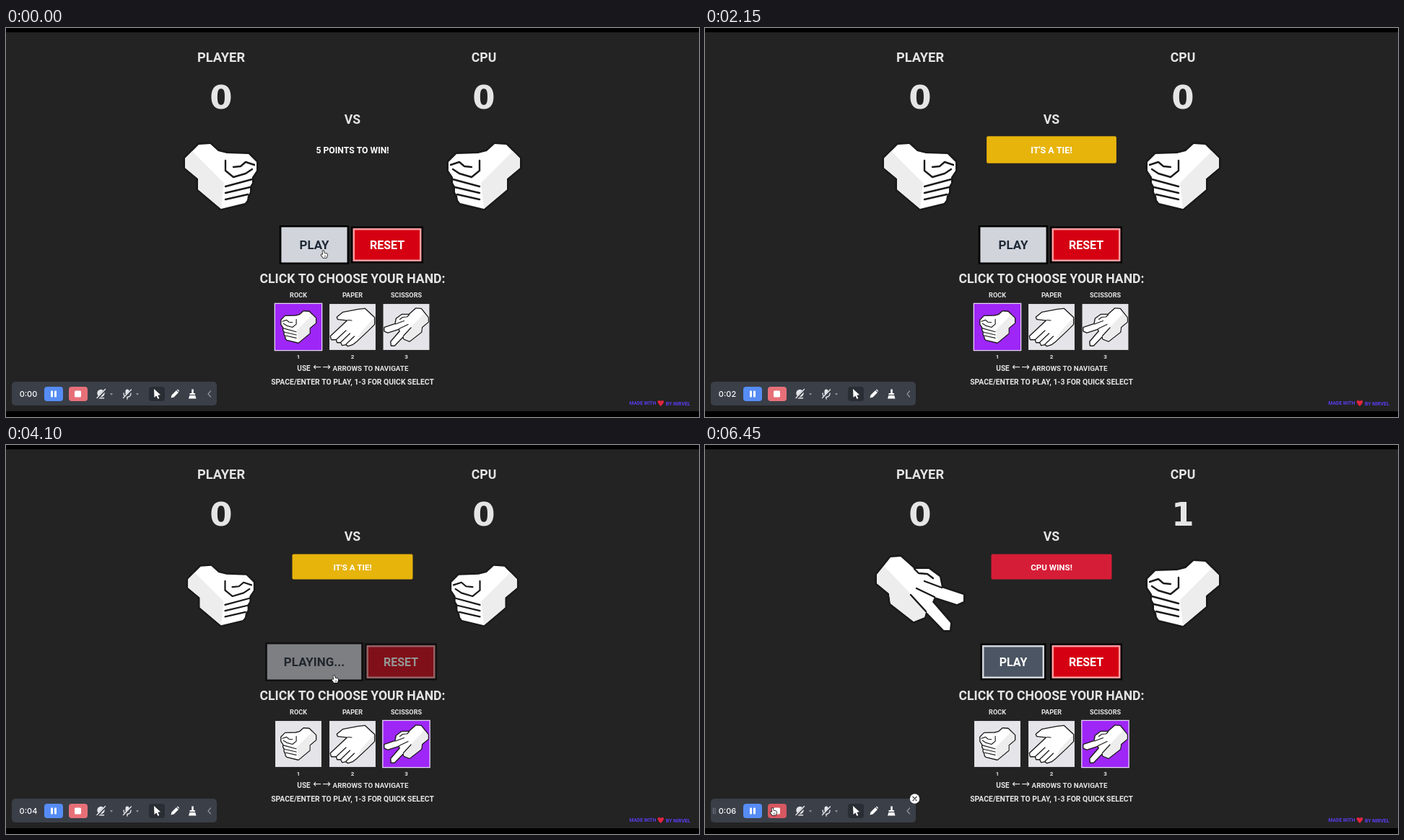
An HTML page with a canvas that plays this animation: 960x540 px, repeating every 6500 ms.

```html
<!DOCTYPE html>
<html lang="en">
<head>
<meta charset="utf-8">
<title>Rock Paper Scissors</title>
<style>
html, body { margin: 0; width: 100%; height: 100%; overflow: hidden; background: #000; }
canvas { display: block; }
</style>
</head>
<body>
<canvas id="stage" width="960" height="540"></canvas>
<script>
const ctx = document.getElementById('stage').getContext('2d');
const LOOP = 6500, STEP = 50;
const BG = '#232323', INK = '#e5e5e5', DARK = '#1a1a1a';
const ROUNDS = [
  { start: 300, end: 1830, label: "IT'S A TIE!", color: [231, 180, 12] },
  { start: 3650, end: 5150, label: 'CPU WINS!', color: [214, 29, 55] }
];
const PICK = 2780;

// Hands are drawn around their own centre, fingers pointing right.
const HANDS = {
  rock: {
    body: 'M-50-25L-31-44L-15-45L-4-35L8-32L38-31L49-20L49-8L43 1L43 9L40 14L40 22L37 27L36 33L33 37L0 45L-32 18L-32 3L-50-12Z',
    shade: 'M-50-25L-40-35L4 9L0 45L-32 18L-32 3L-50-12Z',
    lines: 'M6-22V-8L17 1L34-4L43-10M17-13L27-14L34-20L46-16M6 14L43 4M6 23L40 15M6 32L37 25'
  },
  scissors: {
    body: 'M-60-26L-41-50L-27-51L-8-34L12-34L27-23L30-8L60 2L60 11L51 15L20 5L17 12L42 41L41 51L33 51L8 25L6 33L-9 39L-41 14L-43 0L-60-14Z',
    shade: 'M-60-26L-50-38L-6 8L8 25L6 33L-9 39L-41 14L-43 0L-60-14Z',
    lines: 'M-8-34L-2-28L10-27L18-21M6-17L30-8M-5-7L20 5M-13 2L8 25'
  },
  paper: {
    body: 'M-60-26L-34-50L-16-48L26-40L42-27L40-22L12-19L60 26L58 34L44 34L42 42L32 42L28 50L18 48L12 52L0 48L-8 42L-40 12L-60-8Z',
    shade: 'M-60-26L-24 14L-8 42L-40 12L-60-8Z',
    lines: 'M12-19L2-18M18 10L44 34M7 18L32 42M-5 26L18 48'
  }
};
for (const hand of Object.values(HANDS))
  for (const part in hand) hand[part] = new Path2D(hand[part]);

const clamp = v => Math.max(0, Math.min(1, v));
const progress = (t, start, span) => clamp((t - start) / span);
const smooth = p => p * p * (3 - 2 * p);
const between = (t, a, b) => t >= a && t < b;
const rgb = c => `rgb(${c.map(Math.round)})`;
const mix = (a, b, p) => rgb(a.map((v, i) => v + (b[i] - v) * p));
const pulse = (t, a, b) => smooth(progress(t, a, 150)) * (1 - smooth(progress(t, b, 150)));

function rect(x, y, w, h, color, r = 0) {
  ctx.fillStyle = color;
  ctx.beginPath();
  ctx.roundRect(x, y, w, h, r);
  ctx.fill();
}

function box(w, h, color) {
  rect(-w / 2, -h / 2, w, h, color);
}

function disc(x, y, r, color) {
  ctx.fillStyle = color;
  ctx.beginPath();
  ctx.arc(x, y, r, 0, Math.PI * 2);
  ctx.fill();
}

function text(str, x, y, size, color = INK, family = 'Roboto, sans-serif', weight = 700) {
  ctx.font = `${weight} ${size}px ${family}`;
  ctx.textAlign = 'center';
  ctx.fillStyle = color;
  ctx.fillText(str, x, y + size * 0.36);
}

function line(d, color, width) {
  ctx.strokeStyle = color;
  ctx.lineWidth = width;
  ctx.stroke(new Path2D(d));
}

function shape(d, color) {
  ctx.fillStyle = color;
  ctx.fill(new Path2D(d));
}

function at(x, y, sx, sy, draw) {
  ctx.save();
  ctx.translate(x, y);
  ctx.scale(sx, sy);
  draw();
  ctx.restore();
}

function drawHand(kind, x, y, scale, flip, alpha = 1) {
  const hand = HANDS[kind];
  at(x, y, flip ? -scale : scale, scale, () => {
    ctx.globalAlpha = alpha;
    ctx.strokeStyle = DARK;
    ctx.lineWidth = 5.5;
    ctx.stroke(hand.body);
    ctx.fillStyle = '#fff';
    ctx.fill(hand.body);
    ctx.fillStyle = '#ededed';
    ctx.fill(hand.shade);
    ctx.lineWidth = 2.4;
    ctx.stroke(hand.lines);
  });
}

function drawPlayers(t, round) {
  let scale = 1, lift = 0;
  if (round) {
    const swing = Math.sin((t - round.start) / 420 * Math.PI * 2);
    const enter = progress(t, round.start, 150);
    scale = 1 - (0.07 + 0.035 * swing) * enter;
    lift = 7 * swing;
  }
  const fade = changes => {
    const last = changes.filter(c => c <= t).pop();
    return last === undefined ? 1 : progress(t, last, 250);
  };
  const mine = fade([1830, 2810, 3650, 5150]);
  const theirs = fade([1830, 5150]);
  const kind = between(t, 2810, 3650) || t >= 5150 ? 'scissors' : 'rock';
  drawHand(kind, 298, 206 + lift, scale * (0.8 + 0.2 * mine), false, mine);
  drawHand('rock', 662, 206 + lift, scale * (0.8 + 0.2 * theirs), true, theirs);
}

function drawBanner(t) {
  const result = ROUNDS.filter(r => r.end <= t).pop();
  if (!result) return text('5 POINTS TO WIN!', 480, 170, 12.2, '#fff');
  const scale = 1 + 0.13 * Math.sin(Math.PI * progress(t, result.end, 400));
  at(480, 169, scale, scale, () => {
    rect(-83.5, -17.5, 167, 35, rgb(result.color), 2);
    text(result.label, 0, 0.5, 11.6, '#fff');
  });
}

function drawButton(x, w, scale, fill, border, ink, label, disabled) {
  at(x, 301, scale, scale, () => {
    box(w, 51, '#000');
    box(w - 5, 46, border);
    box(w - 10, 41, fill);
    text(label, 0, 0, 16, ink);
    if (disabled) {
      ctx.globalAlpha = 0.48;
      box(w, 51, BG);
    }
  });
}

function drawButtons(t, round) {
  const hover = Math.max(1 - smooth(progress(t, 2250, 150)), pulse(t, 3450, 5550));
  const fill = mix([75, 85, 99], [209, 213, 219], hover);
  const ink = mix([255, 255, 255], [31, 41, 55], hover);
  const busy = Boolean(round);
  drawButton(427, busy ? 128 : 91, 1 + 0.06 * hover, fill, '#d1d5db', ink, busy ? 'PLAYING...' : 'PLAY', busy);
  drawButton(busy ? 547 : 528, 100, 1, '#d50012', '#ff9ca2', '#fff', 'RESET', busy);
}

function drawTile(name, x, index, scale, picked) {
  const outer = 64 + 2.6 * picked, inner = 63 + picked;
  text(name.toUpperCase(), x, 370.5, 9.1);
  at(x, 415, scale, scale, () => {
    box(outer, outer, mix([205, 205, 210], [233, 213, 255], picked));
    box(inner, inner, mix([229, 229, 233], [158, 38, 246], picked));
    drawHand(name, 0, 0, name === 'rock' ? 0.48 : 0.5, true);
  });
  text(index, x, 456, 8);
}

function drawChooser(t) {
  text('CLICK TO CHOOSE YOUR HAND:', 480, 348, 17.6);
  const picked = progress(t, PICK, 140);
  const hover = pulse(t, 2620, 3150);
  drawTile('rock', 405, '1', 1, 1 - picked);
  drawTile('paper', 480, '2', 1, 0);
  drawTile('scissors', 554.5, '3', 1 + 0.07 * hover, picked);
  text('USE', 412.5, 472, 10);
  text('←', 431, 470, 14, INK, '"DejaVu Sans", sans-serif', 400);
  text('→', 444, 470, 14, INK, '"DejaVu Sans", sans-serif', 400);
  text('ARROWS TO NAVIGATE', 505, 472, 9.8);
  text('SPACE/ENTER TO PLAY, 1-3 FOR QUICK SELECT', 480, 491, 10.4);
}

function drawCredit() {
  const violet = '#5b3df0';
  text('MADE WITH', 882, 521, 6.7, violet);
  text('BY NIRVEL', 931, 521, 7, violet);
  shape('M907 525C900 519 903 515 907 518C911 515 914 519 907 525Z', '#e2263f');
}

function drawToolbar(t) {
  const hover = progress(t, 6200, 100);
  const panel = '#3a3f48', grey = '#e4e6e9', dim = '#8b9099';
  rect(8, 491, 284, 33, panel, 5);
  text(`0:0${Math.floor(t / 1000)}`, 31, 508, 11, '#fff', 'Inter, sans-serif', 500);
  rect(53, 498, 26, 20, '#568cf5', 4);
  rect(62, 503.5, 3, 9, '#fff', 1);
  rect(67, 503.5, 3, 9, '#fff', 1);
  rect(87, 498, 26, 20, mix([231, 112, 120], [214, 88, 97], hover), 4);
  rect(95, 503.5, 9, 9, '#fff', 1.5);

  disc(131.5, 507, 5.2, grey);
  line('M127.5 513.7H135.5', grey, 1.6);
  line('M126.5 514.5L138 502', panel, 3);
  line('M126 513.5L137.5 501.5', grey, 1.4);
  rect(165.5, 501.5, 5, 8.5, grey, 2.5);
  line('M163 507C163 514 173 514 173 507M168 512V515', grey, 1.4);
  line('M163 514.5L174 503', panel, 3);
  line('M162.5 513.5L173.5 502', grey, 1.4);
  for (const x of [146, 182]) shape(`M${x - 2} 507H${x + 2}L${x} 510Z`, dim);

  rect(198, 498, 22, 20, '#292d34', 4);
  shape('M205 501L205.5 513L208.3 510.5L210.5 515L212.3 514L210.3 509.8L214 509.3Z', '#fff');
  shape('M228.5 513.5L229.5 509.5L236 503L239 506L232.5 512.5ZM236.7 502.2L238 501.5L240 503.8L239.6 505Z', '#fff');
  shape('M257.2 501.5H259.8V507H262V509H254.5V507H257.2ZM254.3 510H262.2L263.5 514.5H253Z', '#fff');
  line('M283.5 504L280 508L283.5 512', dim, 1.3);

  if (hover > 0) {
    line('M11.5 504V512M14 504V512', '#757b85', 1);
    disc(290.5, 491, 6.7, '#fff');
    line('M288 488.5L293 493.5M293 488.5L288 493.5', '#333', 1.2);
  }
}

const CURSOR_STOPS = [
  [0, 441, 314], [2200, 441, 314], [2700, 553, 421], [3100, 553, 421],
  [3550, 456, 325], [5500, 456, 325], [5800, 440, 355], [6250, 95, 509], [LOOP, 95, 509]
];

function drawCursor(t) {
  if (between(t, 2100, 2250)) return;
  const i = CURSOR_STOPS.findIndex(stop => stop[0] > t);
  const [t0, x0, y0] = CURSOR_STOPS[i - 1];
  const [t1, x1, y1] = CURSOR_STOPS[i];
  const p = smooth(progress(t, t0, t1 - t0));
  const pointing = !between(t, 2250, 2620) && !between(t, 3200, 3450) && !between(t, 5600, 6200);
  const path = new Path2D(pointing
    ? 'M-2.5-4.5Q-1.5-5.5-.7-4.3L-.3-1.5L3.2-.8Q4.5-.2 4 2.2L2.8 5H-1.5L-4.3 1.5Q-4.5 0-3 .3L-1.9 1.2Z'
    : 'M-3-5L-3 5L-.6 3L1 6.5L2.6 5.7L1 2.4L4 2.2Z');
  at(x0 + (x1 - x0) * p, y0 + (y1 - y0) * p, 1, 1, () => {
    ctx.strokeStyle = '#111';
    ctx.lineWidth = 1.6;
    ctx.stroke(path);
    ctx.fillStyle = '#fff';
    ctx.fill(path);
    if (pointing) line('M.2 2V4M1.8 2V4', '#333', 0.6);
  });
}

function draw(t) {
  const round = ROUNDS.find(r => between(t, r.start, r.end));
  rect(0, 0, 960, 540, '#000');
  rect(0, 6, 960, 526, BG);
  text('PLAYER', 298, 40.5, 18.3);
  text('CPU', 662, 40.5, 17.6);
  text('VS', 480, 127, 17.6);
  text('0', 298, 96, 45, INK, '"DejaVu Sans", sans-serif');
  text(t >= 5150 ? '1' : '0', 662, 96, 45, INK, '"DejaVu Sans", sans-serif');
  drawPlayers(t, round);
  drawBanner(t);
  drawButtons(t, round);
  drawChooser(t);
  drawCredit();
  drawToolbar(t);
  drawCursor(t);
}

ctx.lineJoin = 'round';
ctx.lineCap = 'round';
const origin = performance.now();
function tick() {
  const t = (performance.now() - origin) % LOOP;
  draw(Math.floor(t / STEP) * STEP);
  requestAnimationFrame(tick);
}
tick();
</script>
</body>
</html>
```
